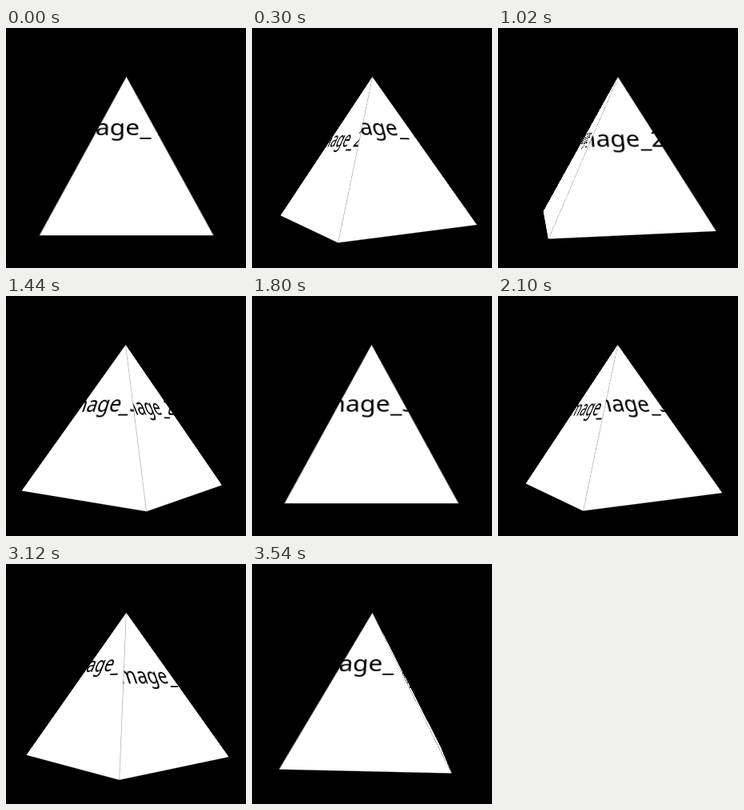
Write an HTML page that moves like this. It is 300 px wide and 300 px high and loops after 3600 ms.

```html
<!DOCTYPE html>
<html lang="en">
<head>
<meta charset="utf-8">
<title>Spinning pyramid</title>
<style>
  html, body { margin: 0; width: 100%; height: 100%; overflow: hidden; background: #000; }
  #stage { position: relative; width: 300px; height: 300px; overflow: hidden; perspective: 506px; }
  #pyramid { position: absolute; inset: 0; transform-style: preserve-3d; }
  .face {
    position: absolute; left: 60.5px; top: 60.5px; width: 179px; height: 200.1px;
    background: #fff; transform-origin: 50% 0; backface-visibility: hidden;
    clip-path: polygon(50% 0, 100% 100%, 0 100%);
  }
  text { font: 29.7px "Noto Sans", sans-serif; }
</style>
</head>
<body>
<div id="stage"><div id="pyramid"></div></div>
<script>
const LOOP = 3600, STEP = 60;
const TILT = Math.atan(0.5);

// Heading of each side in degrees and where its label starts
const sides = [
  { turn: 0, label: "image_1", x: 18, y: 83 },
  { turn: -90, label: "image_2", x: 20, y: 98 },
  { turn: 180, label: "image_3", x: 24, y: 94 },
  { turn: 90, label: "image_4", x: 33.7, y: 99.5 },
];

const pyramid = document.getElementById("pyramid");
pyramid.innerHTML = sides.map(({ turn, label, x, y }) =>
  `<svg class="face" style="transform: rotateY(${turn}deg) rotateX(${TILT}rad)">
     <text x="${x}" y="${y}">${label}</text>
   </svg>`).join("");

const start = performance.now();

function draw() {
  const time = (performance.now() - start) % LOOP;
  const angle = Math.floor(time / STEP) * STEP / LOOP * 360;
  pyramid.style.transform = `rotateY(${angle}deg)`;
  requestAnimationFrame(draw);
}
draw();
</script>
</body>
</html>
```
